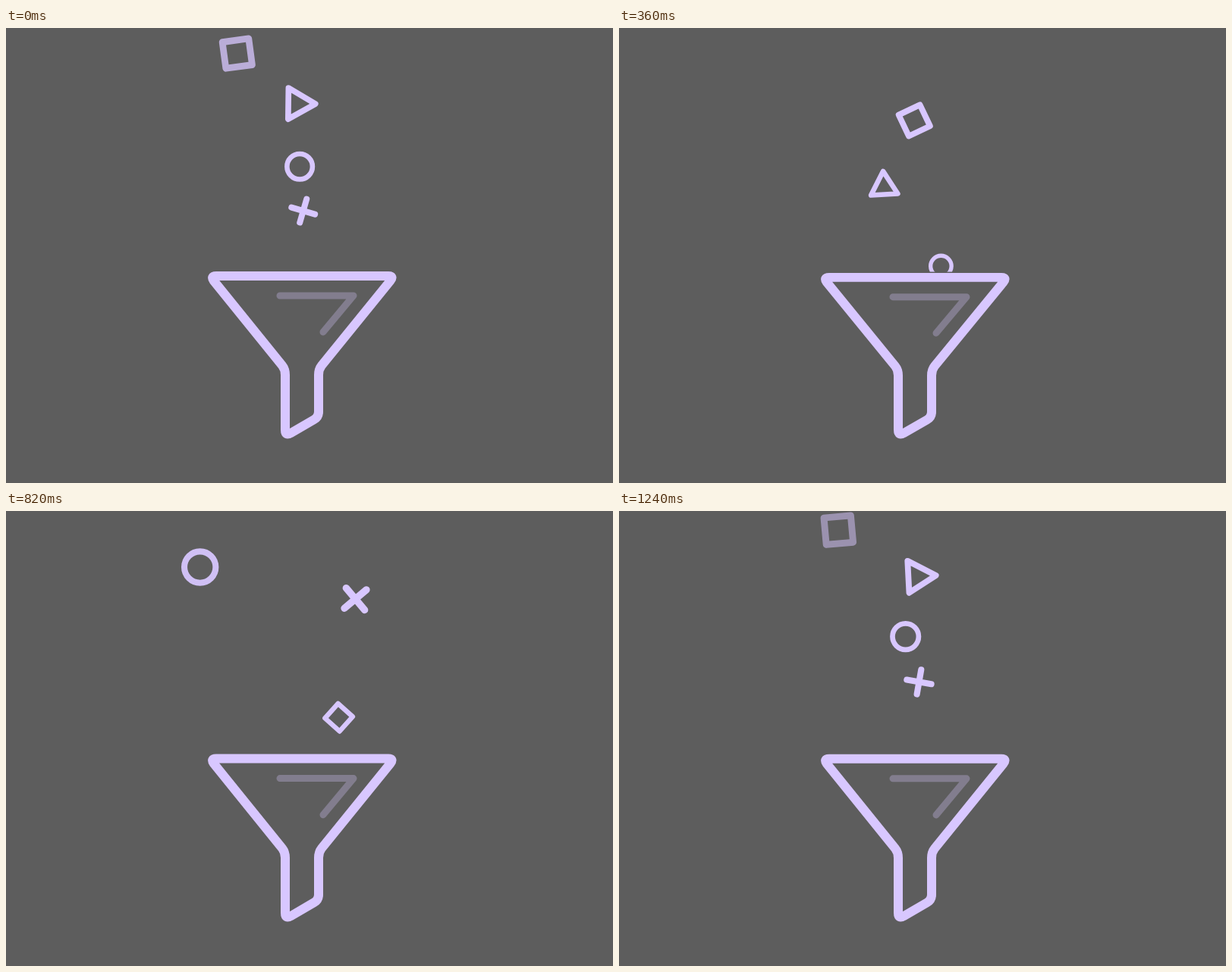
These frames come from a looping animation (800x600 px, 1280 ms). An HTML page:

```html
<!DOCTYPE html>
<html lang="en">
<head>
<meta charset="utf-8">
<title>Funnel</title>
<style>
  html, body { margin: 0; width: 100%; height: 100%; overflow: hidden; background: #5d5d5d; }
  svg { display: block; width: 800px; height: 600px; }
</style>
</head>
<body>
<svg viewBox="0 0 800 600" fill="none" stroke="#d8c7ff" stroke-linecap="round" stroke-linejoin="round">
  <clipPath id="above"><rect width="800" height="321.5"/></clipPath>
  <g id="pieces" clip-path="url(#above)"></g>
  <g id="funnel">
    <path stroke-width="9" stroke-opacity=".3" d="M361 353H458L418 401"/>
    <path stroke-width="12" d="M277 327H504Q511.6 327 506.5 333.4L416 445Q412 450 412 457.5V506Q412 513 406 516.4L375.5 534.1Q368 538.4 368 530V457.5Q368 450 364 445L273.8 333.4Q269.2 327 277 327Z"/>
  </g>
</svg>
<script>
const LOOP = 1280, STEPS = 25;
const TICK = 20, TICKS_PER_STEP = 2.588;
const FADE_STEPS = 4;
const BASE = 541, RIM = 327;

// Each piece glides along its route at a steady speed while it turns and shrinks.
// All rates are per step; shapes have a unit size around the origin.
const pieces = [
  { // cross
    shape: 'M-.5 0H.5M0 -.5V.5', weight: .248,
    route: 'M560 60C437 107 382 175 382 350',
    start: 8.89, speed: 16.15, size: 42.3, shrink: .63, angle: 5.5, spin: 6.25
  },
  { // circle
    shape: 'M1 0A1 1 0 1 1 -1 0A1 1 0 1 1 1 0Z', weight: .39,
    route: 'M183 62L197 65C344 73.5 417 168 430 371',
    start: 12.23, speed: 19.58, size: 22.3, shrink: .432, angle: 0, spin: 0
  },
  { // triangle
    shape: 'M.5774 0L-.2887 .5V-.5Z', weight: .186,
    route: 'M484.5 16C348 82 341 187 348 340',
    start: 17, speed: 16.57, size: 47.8, shrink: .83, angle: -29, spin: 3.72
  },
  { // square
    shape: 'M-.5 -.5H.5V.5H-.5Z', weight: .25,
    route: 'M256 11.5C400 59 435 205.6 450 358',
    start: 21.96, speed: 17.66, size: 36.7, shrink: .57, angle: 0, spin: -2.53
  }
];

const el = id => document.getElementById(id);

function makePath(d) {
  const path = document.createElementNS('http://www.w3.org/2000/svg', 'path');
  path.setAttribute('d', d);
  return path;
}

for (const p of pieces) {
  p.track = makePath(p.route);
  p.node = makePath(p.shape);
  p.node.setAttribute('stroke-width', p.weight);
  el('pieces').append(p.node);
}

// Poses are held: every step starts on a whole clock tick.
function stepAt(time) {
  const ticks = Math.floor(time % LOOP / TICK);
  return Math.min(STEPS, Math.ceil((ticks + .5) / TICKS_PER_STEP)) - 1;
}

function place(p, step) {
  const age = (step - p.start + STEPS) % STEPS;
  const { x, y } = p.track.getPointAtLength(p.speed * age);
  const angle = p.angle + p.spin * age, size = p.size - p.shrink * age;
  p.node.setAttribute('transform', `translate(${x} ${y}) rotate(${angle}) scale(${size})`);
  p.node.setAttribute('opacity', Math.min(1, age / FADE_STEPS));
}

function draw(time) {
  const step = stepAt(time);
  pieces.forEach(p => place(p, step));
  // The rim dips and rises once per loop; the spout stays put.
  const dip = 1.9 * Math.sin(2 * Math.PI * (step - .8) / STEPS) ** 3;
  const k = 1 - dip / (BASE - RIM);
  el('funnel').setAttribute('transform', `translate(0 ${BASE * (1 - k)}) scale(1 ${k})`);
}

let begin = null;
function tick(now) {
  if (begin === null) begin = now;
  draw(Math.max(0, now - begin));
  requestAnimationFrame(tick);
}
draw(0);
requestAnimationFrame(tick);
</script>
</body>
</html>
```
